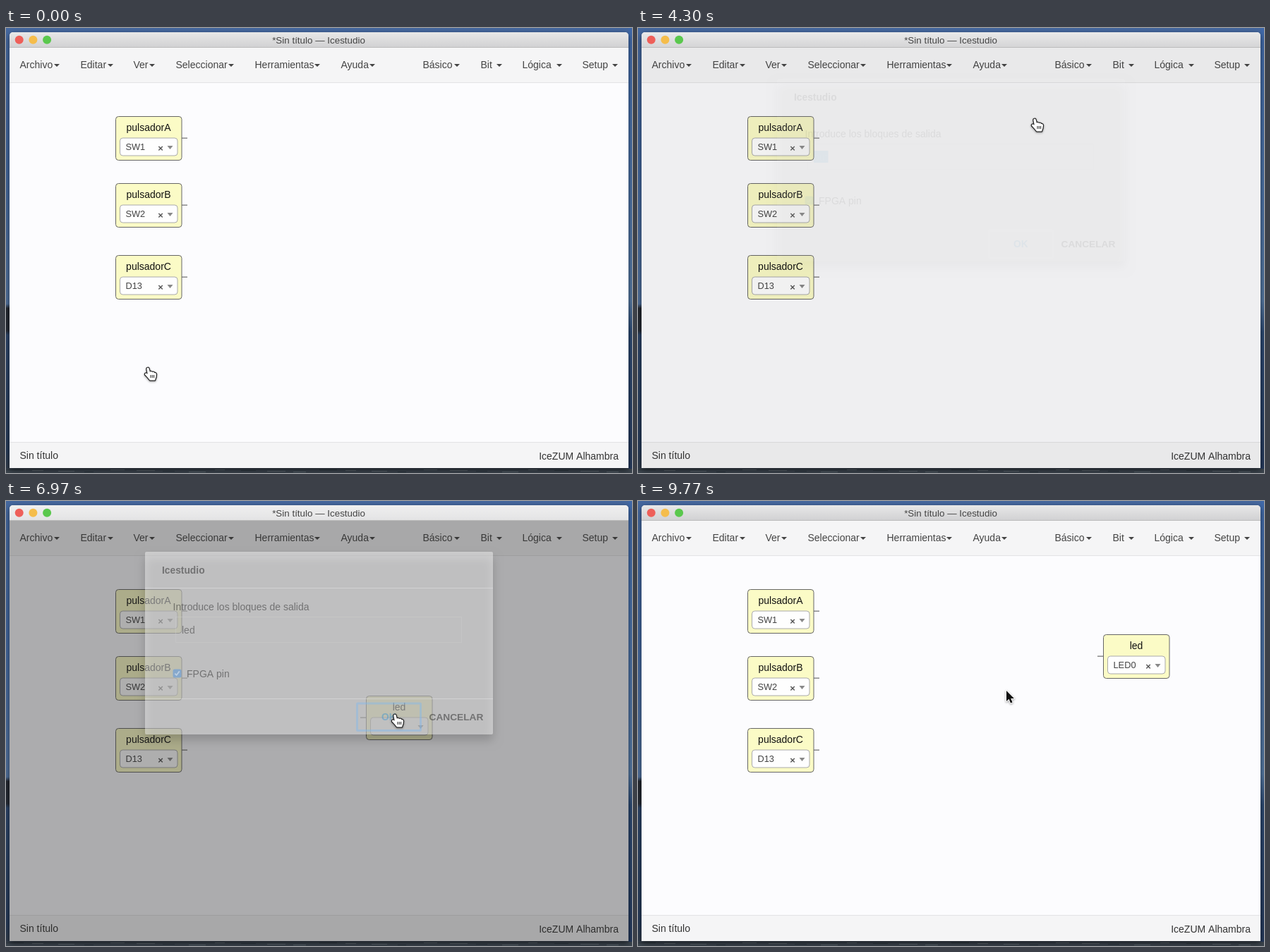
These frames come from a looping animation (887 px wide and 631 px high, 9810 ms). An HTML page with a canvas:

```html
<!DOCTYPE html>
<html lang="es">
<head>
<meta charset="utf-8">
<title>Icestudio</title>
<style>
html, body { margin: 0; width: 100%; height: 100%; overflow: hidden; background: #345; }
canvas { display: block; }
</style>
</head>
<body>
<canvas id="stage" width="887" height="631"></canvas>
<script>
const c = document.getElementById('stage').getContext('2d');
const LOOP = 9810, GRID = 7.88;
const MENU = [2370, 4020], PLACED = 6850, DRAG = [7100, 7950];
const LIST = [8430, 8930];

// Pointer hot spot: time, x, y
const PATH = [
  [0, 201, 482], [500, 201, 482], [2350, 607, 58], [2600, 607, 58], [2700, 606, 75],
  [3570, 562, 127], [4030, 562, 129], [4330, 562, 129], [4430, 562, 127], [5600, 562, 127],
  [6500, 551, 303], [7100, 551, 303], [7330, 604, 254], [7900, 706, 222], [8120, 706, 222],
  [8400, 737, 233], [8520, 737, 233], [8820, 700, 285], [9000, 700, 285], [9600, 522, 269], [LOOP, 522, 269]
];
const NAV = [
  ['Archivo', 20, 68], ['Editar', 106, 144], ['Ver', 181, 203], ['Seleccionar', 241, 315],
  ['Herramientas', 353, 437], ['Ayuda', 475, 515], ['Básico', 591, 635], ['Bit', 673, 695],
  ['Lógica', 732, 780], ['Setup', 817, 859]
];
const ITEMS = [
  ['Entrada', '#f2f27c'], ['Salida', '#f2f27c'], ['Constante', '#f3d88c'],
  ['Código', '#b2e2ec'], ['Información', '#d8d8da']
];
const HAND = new Path2D('M-1.6 1.7C-1.8-.6 1.2-.8 1.7 1.2L2.8 5.6C4 4.6 5.6 5 6 6.2' +
  'C7.3 5.4 8.9 5.9 9.2 7.1C10.8 6.6 12 7.6 12 9.2L11.5 13 10 17.5H3L-.8 13-4 9.6C-4.6 7.4-2.4 6.8-.3 8.8Z');
const ARROW = new Path2D('M0 0V15L3.5 11.8 6 17.6 8.6 16.5 6.2 10.9H11Z');
const MOVE = new Path2D('M0-8L3.5-4.2H1.3V-1.3H4.2V-3.5L8 0 4.2 3.5V1.3H1.3V4.2H3.5L0 8-3.5 4.2H-1.3V1.3H-4.2V3.5' +
  'L-8 0-4.2-3.5V-1.3H-1.3V-4.2H-3.5Z');

const between = (t, [a, b]) => t >= a && t < b;
const ramp = (t, a, b) => Math.min(1, Math.max(0, (t - a) / (b - a)));

function pointer(t) {
  const i = PATH.findIndex(p => p[0] > t);
  const [t0, x0, y0] = PATH[i - 1], [t1, x1, y1] = PATH[i];
  const u = ramp(t, t0, t1), k = u * u * (3 - 2 * u);
  return [x0 + (x1 - x0) * k, y0 + (y1 - y0) * k];
}

function rect(x, y, w, h, fill, stroke, r = 0, line = 1) {
  c.beginPath();
  c.roundRect(x, y, w, h, r);
  if (fill) { c.fillStyle = fill; c.fill(); }
  if (stroke) { c.strokeStyle = stroke; c.lineWidth = line; c.stroke(); }
}

function text(s, x, y, color = '#333', size = 14, align = 'left', weight = '') {
  c.font = `${weight} ${size}px "Liberation Sans", Arial, sans-serif`;
  c.textAlign = align;
  c.fillStyle = color;
  c.fillText(s, x, y);
}

function caret(x, y, color = '#444', w = 8, h = 4) {
  c.fillStyle = color;
  c.beginPath();
  c.moveTo(x, y); c.lineTo(x + w, y); c.lineTo(x + w / 2, y + h);
  c.fill();
}

function dot(x, y, r, color) {
  c.fillStyle = color;
  c.beginPath(); c.arc(x, y, r, 0, 7); c.fill();
}

function gradient(y0, y1, ...stops) {
  const g = c.createLinearGradient(0, y0, 0, y1);
  stops.forEach(([at, color]) => g.addColorStop(at, color));
  return g;
}

function shadow(blur, dy, color, draw) {
  c.save();
  c.shadowBlur = blur; c.shadowOffsetY = dy; c.shadowColor = color;
  draw();
  c.restore();
}

function desktop() {
  rect(0, 0, 887, 631, gradient(0, 631, [0, '#45689f'], [.3, '#41659c'], [.62, '#50709c'],
    [.63, '#22262e'], [.68, '#252a34'], [.69, '#2c4468'], [.95, '#263a58'], [1, '#343c46']));
  rect(882, 0, 5, 625, gradient(0, 625, [0, '#3f68a8'], [.62, '#52759f'], [.69, '#2b4871'], [1, '#24385a']));
  rect(0, 625, 887, 6, '#3b444d');
  for (let i = 0; i < 60; i++) rect(i * 37 % 887, 626 + i % 4, 9 + i * 7 % 17, 1, i % 3 ? '#59626a' : '#2c353e');
}

function block(x, y, name, value, input) {
  const port = input ? x - 8 : x + 94;
  rect(port, y + 30.5, 8, 1.3, '#777');
  rect(x + .5, y + .5, 93.5, 62, '#fbfbc6', '#666', 4);
  text(name, x + 47, y + 21, '#111', 14, 'center');
  rect(x + 6.5, y + 31, 81.5, 25, '#fefefe', '#aaa', 4);
  text(value, x + 14.5, y + 47.5, '#444', 12.8);
  if (value) text('×', x + 64, y + 49.5, '#555', 13, 'center', 'bold');
  caret(x + 73.5, y + 42, '#888', 8, 5);
}

function windowFrame(dim) {
  shadow(8, 3, 'rgba(0,0,0,.55)', () => rect(5, 6, 877, 618, '#fcfcfe', 0, [5, 5, 0, 0]));
  rect(5, 6, 877, 22, gradient(6, 28, [0, '#e8e8e8'], [1, '#d0d0d2']), 0, [5, 5, 0, 0]);
  rect(5, 6, 877, 22, `rgba(246,246,246,${dim * .65})`, 0, [5, 5, 0, 0]);
  rect(5, 27, 877, 1, '#bcbcbc');
  ['#ee5f59', '#f5bd4b', '#5ac84d'].forEach((color, i) => dot(18.7 + i * 19.7, 16.7, 6, color));
  text('*Sin título — Icestudio', 443, 21.5, '#444', 13.4, 'center');
}

function page(t, x, y) {
  rect(5, 28, 877, 49, '#f5f5f6');
  rect(5, 77, 877, 1, '#e3e3e5');
  rect(5, 587, 877, 37, '#f5f5f6');
  rect(5, 587, 877, 1, '#e3e3e5');
  if (between(t, MENU)) rect(576, 28, 81, 49, '#e4e4e6');
  for (const [label, left, arrow] of NAV) {
    text(label, left - .5, 57, '#444');
    caret(arrow, 51);
  }
  text('Sin título', 19.5, 611, '#333');
  text('IceZUM Alhambra', 868, 612, '#333', 14, 'right');
  block(155, 125, 'pulsadorA', 'SW1');
  block(155, 220, 'pulsadorB', 'SW2');
  block(155, 322, 'pulsadorC', 'D13');
  if (t >= PLACED) led(t);
  if (between(t, MENU)) menu(x, y);
}

function led(t) {
  const [x, y] = pointer(Math.min(t, DRAG[1]));
  const left = Math.round(509.6 + Math.floor((x - 551) / GRID) * GRID);
  const top = Math.round(275.5 + Math.floor((y - 303) / GRID) * GRID);
  block(left, top, 'led', t >= LIST[1] ? 'LED0' : '', true);
  if (between(t, LIST)) pinList(left + 6, top + 56);
}

function pinList(x, y) {
  rect(x + .5, y + .5, 82, 126, '#fff', '#aaa', [0, 0, 4, 4]);
  rect(x + 4.5, y + 4.5, 74, 22, '#fff', '#aaa');
  rect(x + 1, y + 31, 81, 24, '#5897fb');
  for (let i = 0; i < 4; i++) text('LED' + i, x + 8, y + 47 + i * 24, i ? '#444' : '#fff', 12.8);
}

function menu(x, y) {
  shadow(10, 5, 'rgba(0,0,0,.28)', () => rect(500.5, 77.5, 156, 138.5, '#fdfdfe', '#c4c4c6', [0, 0, 4, 4]));
  ITEMS.forEach(([label, color], i) => {
    const mid = 96 + i * 25.6;
    if (x > 500 && x < 657 && y > 84 && Math.abs(y - mid) < 12.8) rect(501, mid - 12.8, 155, 25.6, '#f3f3f4');
    dot(524.7, mid, 3.2, color);
    text(label, 536.5, mid + 5, '#333');
  });
}

function dialog(t) {
  shadow(14, 8, 'rgba(0,0,0,.4)', () => rect(197, 72, 493, 259, '#fcfcfd', 0, 2));
  rect(197, 123, 493, 1, '#e9e9ea');
  rect(197, 280, 493, 1, '#e9e9ea');
  text('Icestudio', 221, 102.5, '#111', 13.8, 'left', 'bold');
  text('Introduce los bloques de salida', 236.5, 155, '#111');

  const focused = t > 4380 && t < 6780;
  if (focused) rect(240, 163.5, 407, 38, '#fff', '#7fb6ee', 1, 3);
  else rect(240.5, 164.5, 405, 36, 0, '#ccc');
  const typed = 'led'.slice(0, Math.max(0, Math.floor((t - 4850) / 200)));
  if (typed) {
    text(typed, 249, 187.5, '#222');
    if (focused && t % 1000 < 500) rect(250 + c.measureText(typed).width, 175, 1, 16, '#222');
  } else {
    rect(249, 174, 20.5, 17, '#3e8fcf');
    text('out', 249, 187.5, '#fff');
  }

  rect(236.5, 238.5, 12, 12, '#3f8cf0', 0, 2.5);
  c.strokeStyle = '#fff';
  c.lineWidth = 1.8;
  c.stroke(new Path2D('M239.3 244.7L241.6 247 245.8 241.4'));
  text('FPGA pin', 256, 249.5, '#111');
  if (!focused) rect(497.5, 287, 90, 38.5, 0, t < 5000 ? '#fff' : '#7fb6ee', 1, 3);
  text('OK', 532, 310.5, '#3593d0', 13.8, 'left', 'bold');
  text('CANCELAR', 599.5, 310.5, '#111', 13.7, 'left', 'bold');
}

function outlined(shape, fill, edge, line) {
  c.lineWidth = line;
  c.lineJoin = 'round';
  c.strokeStyle = edge;
  c.fillStyle = fill;
  shadow(3, 1, 'rgba(0,0,0,.4)', () => c.stroke(shape));
  c.fill(shape);
}

function cursor(t, x, y) {
  c.save();
  c.translate(x, y);
  const overDialog = between(t, [4400, 6800]) && (y < 287 || x < 497);
  if (between(t, DRAG)) outlined(MOVE, '#111', '#fff', 2);
  else if (overDialog || t > 9000) outlined(ARROW, '#111', '#fff', 2);
  else {
    outlined(HAND, '#fff', '#222', 2.4);
    c.lineWidth = 1;
    c.stroke(new Path2D('M4 10V14M6.3 10V14M8.6 10V14'));
  }
  c.restore();
}

function draw(t) {
  const [x, y] = pointer(t);
  const dim = ramp(t, 4285, 4420) - ramp(t, 6920, 7112);
  const show = ramp(t, 4292, 4425) - ramp(t, 6850, 7068);
  desktop();
  windowFrame(dim);
  page(t, x, y);
  if (dim > 0) rect(5, 28, 877, 596, `rgba(37,37,37,${dim * .5})`);
  if (show > 0) {
    c.globalAlpha = show;
    dialog(t);
    c.globalAlpha = 1;
  }
  cursor(t, x, y);
}

const start = performance.now();
(function tick() {
  draw((performance.now() - start) % LOOP);
  requestAnimationFrame(tick);
})();
</script>
</body>
</html>
```
